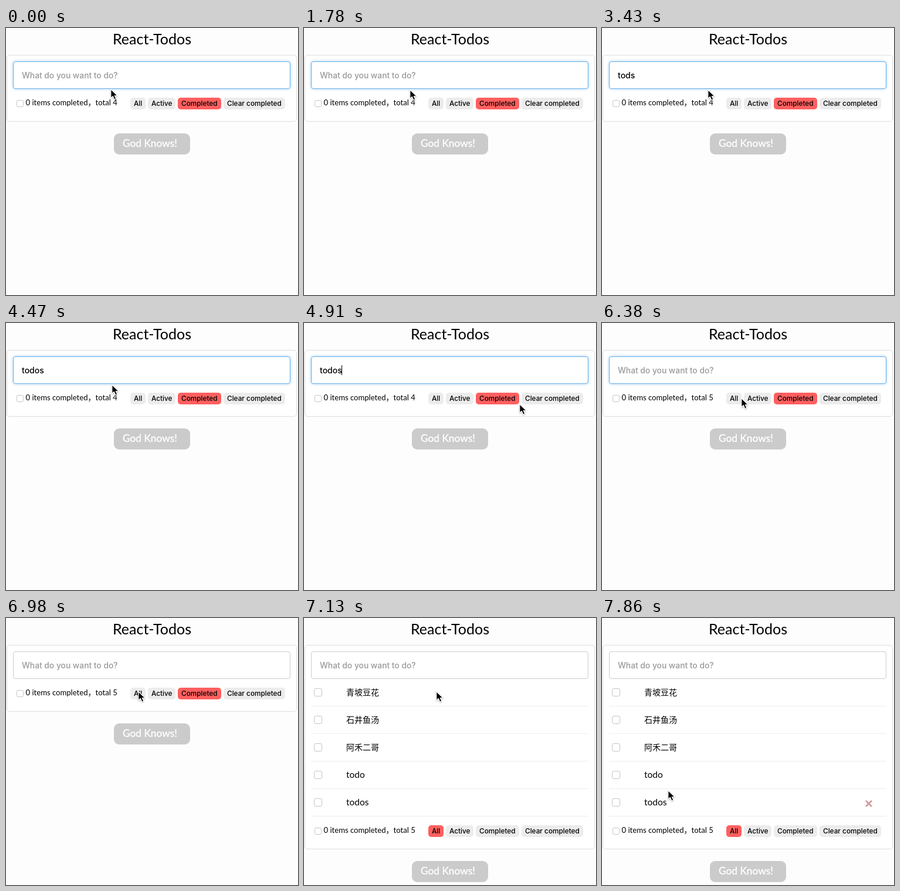
Write an HTML page that moves like this. It is 498x456 px and loops after 8 s.

```html
<!DOCTYPE html>
<html lang="zh-CN">
<head>
<meta charset="utf-8">
<title>React-Todos</title>
<style>
html, body { margin: 0; width: 100%; height: 100%; overflow: hidden; background: #fdfdfd; }
svg { display: block; }
text { white-space: pre; }
.round { font-family: "Century Gothic", Lato, "Noto Sans CJK SC", "Noto Sans CJK", sans-serif; }
.ui { font-family: Inter, Roboto, sans-serif; font-weight: 500; }
.title { font-size: 25px; }
.count { font-size: 13.1px; }
.item { font-size: 15.5px; }
.item.han { font-size: 14px; }
.button { font-size: 17.3px; fill: #fff; stroke: #fff; stroke-width: .35; }
.hint { font-size: 13.8px; fill: #999; }
.typed { font-size: 14px; }
.pill { font-size: 11.8px; }
.box { fill: #fff; stroke: #c6c6c6; }
#input { fill: #fff; stroke: #ccc; }
#input.focus { stroke: #66afe9; filter: drop-shadow(0 0 2.5px rgba(102, 175, 233, .6)); }
</style>
</head>
<body>
<svg id="stage" width="498" height="456" viewBox="0 0 498 456"></svg>
<script>
const LOOP = 8000, TICK = 148.4, ROW = 47, LIST_TOP = 104;
const stage = document.getElementById('stage');

function add(tag, attrs, parent = stage, content = '') {
  const el = document.createElementNS('http://www.w3.org/2000/svg', tag);
  for (const key in attrs) el.setAttribute(key, attrs[key]);
  el.textContent = content;
  parent.append(el);
  return el;
}
const rect = (x, y, width, height, rx, attrs, parent) =>
  add('rect', { x, y, width, height, rx, ...attrs }, parent);
const label = (x, y, cls, content, parent, attrs) =>
  add('text', { x, y, class: cls, ...attrs }, parent, content);
const show = (el, on) => el.setAttribute('visibility', on ? 'visible' : 'hidden');

label(249, 28, 'round title', 'React-Todos', stage, { 'text-anchor': 'middle' });
const panel = rect(1.5, 46.5, 494, 113, 4.5, { fill: '#fff', stroke: '#ddd' });
const input = rect(12.5, 57.5, 472, 46, 3.5, { id: 'input' });
const hint = label(27, 86, 'ui hint', 'What do you want to do?');
const typed = label(27, 86, 'ui typed', '');
const caret = rect(27, 72, 1, 17, 0, {});

// Todo rows
const list = add('g', {});
['青坡豆花', '石井鱼汤', '阿禾二哥', 'todo', 'todos'].forEach((name, i) => {
  const y = LIST_TOP + i * ROW;
  rect(17.5, y + 16.5, 13, 13, 2.5, { class: 'box' }, list);
  label(72, y + 28, /\w/.test(name) ? 'round item' : 'round item han', name, list);
  rect(12, y + 46, 473, 1, 0, { fill: '#ededed' }, list);
});
const cross = add('path', {
  d: 'M450 -5l10 10m0 -10l-10 10', fill: 'none', stroke: '#cf9a9a', 'stroke-width': 2.6
});

// Footer and button move down with the list
const lower = add('g', {});
rect(18.5, 123.5, 11, 11, 2, { class: 'box' }, lower);
const count = label(33.5, 132, 'round count', '', lower);
let pillX = 212;
const pills = Object.entries({ All: 26, Active: 47, Completed: 74, 'Clear completed': 105 })
  .map(([name, width]) => {
    const bg = rect(pillX, 119, width, 20, 5, {}, lower);
    label(pillX + 6, 133, 'ui pill', name, lower);
    pillX += width + 4;
    return { name, bg };
  });
rect(184, 180, 130, 36, 9, { fill: '#cbcbcb' }, lower);
label(199, 203, 'round button', 'God Knows!', lower);

const pointer = add('path', {
  d: 'M.8 -.5v15.3l3.5 -3.3 2.6 5.7 3 -1.3 -2.6 -5.4h4.9z',
  stroke: '#fff', 'stroke-linejoin': 'round', 'stroke-width': 1.2,
  style: 'filter: drop-shadow(0 1px 1px rgba(0,0,0,.3))'
});

// All times below are in ticks
const ENTER = 39, BLUR = 47, OPEN = 48, HOVER = 51;
const keys = { 2: '', 14: 't', 15: 'to', 17: 'tod', 19: 'tods', 24: 'tod', 26: 'todos', [ENTER]: '' };
const glides = [
  { from: 0, to: 2, x: 180, y: 106 },
  { from: 30, to: 33, x: 367, y: 139 },
  { from: 33, to: 35, x: 364, y: 151 },
  { from: 40, to: 43, x: 237, y: 129 },
  { from: 43, to: 46, x: 225, y: 126 },
  { from: 50, to: 53, x: 112, y: 295 }
];

function pointerAt(n) {
  let x = 178, y = 105;
  for (const g of glides) {
    const p = Math.min(1, Math.max(0, (n - g.from) / (g.to - g.from)));
    const eased = p * p * (3 - 2 * p);
    x += (g.x - x) * eased;
    y += (g.y - y) * eased;
  }
  return [x, y];
}

// The caret stays lit for 4 ticks after a key, then blinks every 3
function caretLit(n, lastKey) {
  const idle = n - lastKey;
  return n < BLUR && (idle < 4 || Math.floor((idle - 4) / 3) % 2 === 1);
}

function draw(t) {
  const n = Math.floor((t + 10) / TICK);
  const [x, y] = pointerAt(n);
  const lastKey = Object.keys(keys).map(Number).findLast(key => key <= n);
  const text = keys[lastKey] ?? '';
  const open = n >= OPEN;
  const filter = open ? 'All' : 'Completed';
  const shift = open ? 5 * ROW : 0;

  pointer.setAttribute('transform', `translate(${x} ${y})`);
  typed.textContent = text;
  show(hint, !text);
  show(caret, caretLit(n, lastKey));
  caret.setAttribute('x', Math.floor(27 + (text ? typed.getComputedTextLength() : 0)));
  input.classList.toggle('focus', n < BLUR);
  count.textContent = `0 items completed，total ${n < ENTER ? 4 : 5}`;
  for (const { name, bg } of pills) bg.setAttribute('fill', name === filter ? '#ff5f5f' : '#ececec');

  show(list, open);
  panel.setAttribute('height', 113 + shift);
  lower.setAttribute('transform', `translate(0 ${shift})`);
  const row = Math.floor((y - LIST_TOP) / ROW);
  show(cross, n >= HOVER);
  cross.setAttribute('transform', `translate(0 ${LIST_TOP + row * ROW + 25})`);
}

const start = performance.now();
function tick() {
  draw((performance.now() - start) % LOOP);
  requestAnimationFrame(tick);
}
tick();
</script>
</body>
</html>
```
